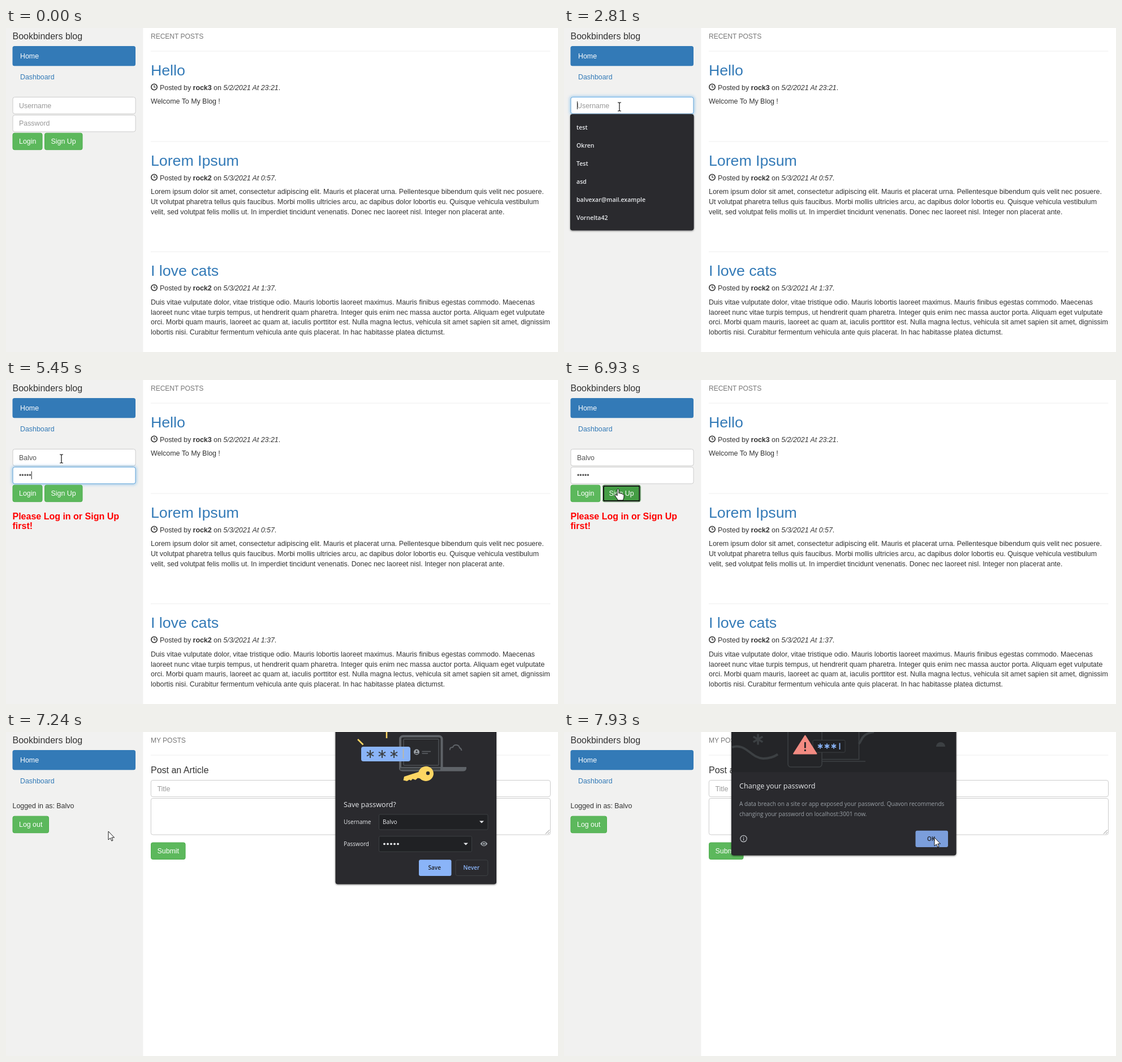
These frames come from a looping animation (976 by 574 pixels, 8000 ms). An HTML page:

```html
<!DOCTYPE html>
<html lang="en">
<head>
<meta charset="utf-8">
<title>Blog login</title>
<style>
  html, body { margin: 0; width: 100%; height: 100%; overflow: hidden; background: #fff; }
  svg { display: block; width: 976px; height: 574px; }
  text { font: 12.4px "Liberation Sans", Arial, sans-serif; fill: #333; white-space: pre; }
  .link { fill: #337ab7; }
  .white { fill: #fff; }
  .hint { fill: #999; }
  .typed { fill: #555; }
  .small { font-size: 12px; fill: #777; }
  .h4 { font-size: 16px; }
  .h2 { font-size: 26.7px; fill: #337ab7; }
  .error { font-size: 16px; font-weight: bold; fill: #f00; }
  .ui, .item, .title, .note { font: 10px "Open Sans", "Noto Sans", sans-serif; fill: #e8eaed; }
  .item { font-size: 10.6px; font-weight: 600; }
  .title { font-size: 12.6px; }
  .note { font-size: 10.1px; fill: #9aa0a6; }
  .blue { fill: #8ab4f8; font-weight: 600; }
  .dark { fill: #202124; font-weight: 600; }
</style>
</head>
<body>
<svg id="stage" viewBox="0 0 976 574"></svg>
<script>
const LOOP = 8000;
const USER = 'Balvo';
const stage = document.getElementById('stage');

// Markup helpers
const text = (x, y, str, cls = '', id = '') => `<text x="${x}" y="${y}" class="${cls}" id="${id}">${str}</text>`;
const box = (x, y, right, bottom, fill, stroke = 'none', r = 3.5, extra = '') =>
  `<rect x="${x}" y="${y}" width="${right - x}" height="${bottom - y}" rx="${r}" fill="${fill}" stroke="${stroke}" ${extra}/>`;
const line = (d, stroke, width = 1, extra = '') =>
  `<path d="${d}" fill="none" stroke="${stroke}" stroke-width="${width}" ${extra}/>`;
const group = (id, content, extra = '') => `<g id="${id}" ${extra}>${content}</g>`;
const star = (x, y, r, color, width) => [0, 60, 120].map(a =>
  line(`M0 ${-r}V${r}`, color, width, `transform="translate(${x} ${y}) rotate(${a})"`)).join('');
const rule = y => line(`M256 ${y}H962.5`, '#eee');
const button = (x, y, right, label) =>
  box(x + .5, y + .5, right - .5, y + 30, '#5cb85c', '#4cae4c', 3) + text(x + 11.5, y + 19.5, label, 'white');

const field = (id, y, hint) => group(id + 'Glow',
    box(12, y, 229, y + 29.5, 'none', '#66afe9', 3.5, 'stroke-width="4" stroke-opacity=".6" filter="url(#glow)"')) +
  box(12, y, 229, y + 29.5, '#fff', '#ccc') +
  box(12, y, 229, y + 29.5, 'none', '#66afe9', 3.5, `id="${id}Edge"`) +
  text(23, y + 19, hint, 'hint', id + 'Hint') + text(23, y + 19, '', 'typed', id) +
  line(`M.5 ${y + 7.5}V${y + 21.5}`, '#222', 1, `id="${id}Caret"`);

const post = (y, title, author, date, lines) => rule(y) +
  text(256, y + 42.7, title, 'h2') +
  `<circle cx="262" cy="${y + 63.5}" r="5.2" fill="none" stroke="#333" stroke-width="1.6"/>` +
  line(`M262 ${y + 60}V${y + 64}H264.8`, '#333', 1.2) +
  text(272, y + 68.5, `Posted by <tspan font-weight="bold">${author}</tspan> on <tspan font-style="italic">${date}</tspan>.`) +
  lines.map((s, i) => text(256, y + 93.4 + i * 17.75, s)).join('');

const homePage = text(256, 19.3, 'RECENT POSTS', 'small') +
  post(41, 'Hello', 'rock3', '5/2/2021 At 23:21', ['Welcome To My Blog !']) +
  post(201, 'Lorem Ipsum', 'rock2', '5/3/2021 At 0:57', [
    'Lorem ipsum dolor sit amet, consectetur adipiscing elit. Mauris et placerat urna. Pellentesque bibendum quis velit nec posuere.',
    'Ut volutpat pharetra tellus quis faucibus. Morbi mollis ultricies arcu, ac dapibus dolor lobortis eu. Quisque vehicula vestibulum',
    'velit, sed volutpat felis mollis ut. In imperdiet tincidunt venenatis. Donec nec laoreet nisl. Integer non placerat ante.']) +
  post(396.5, 'I love cats', 'rock2', '5/3/2021 At 1:37', [
    'Duis vitae vulputate dolor, vitae tristique odio. Mauris lobortis laoreet maximus. Mauris finibus egestas commodo. Maecenas',
    'laoreet nunc vitae turpis tempus, ut hendrerit quam pharetra. Integer quis enim nec massa auctor porta. Aliquam eget vulputate',
    'orci. Morbi quam mauris, laoreet ac quam at, iaculis porttitor est. Nulla magna lectus, vehicula sit amet sapien sit amet, dignissim',
    'lobortis nisi. Curabitur fermentum vehicula ante quis placerat. In hac habitasse platea dictumst.']) +
  group('hover', box(11.5, 69, 229, 104, '#eee')) + text(25, 91, 'Dashboard', 'link') +
  field('name', 122.5, 'Username') + field('pass', 154.3, 'Password') +
  button(11.5, 185.7, 64.5, 'Login') + button(68, 185.7, 135.5, 'Sign Up') +
  group('pressed', box(68.5, 186.2, 135, 215.7, '#449d44', '#398439', 3) +
    group('ring', box(69, 186.7, 134.5, 215.2, 'none', '#fff', 3) +
      box(70, 187.7, 133.5, 214.2, 'none', '#101010', 2, 'stroke-width="2"')) +
    text(79.5, 205.2, 'Sign Up', 'white')) +
  group('error', text(11.5, 246.8, 'Please Log in or Sign Up', 'error') + text(11.5, 263.5, 'first!', 'error'));

const dashboardPage = text(256, 19.3, 'MY POSTS', 'small') + rule(41) +
  text(25, 91, 'Dashboard', 'link') +
  text(11.5, 135.3, 'Logged in as: ' + USER) + button(11.5, 148.7, 76, 'Log out') +
  text(256, 72.5, 'Post an Article', 'h4') +
  box(256.3, 85.5, 962.5, 114.7, '#fff', '#ccc') + text(267.5, 104.5, 'Title', 'hint') +
  box(256.3, 117.5, 962.5, 182, '#fff', '#ccc') +
  line('M954 180.5L961 173.5M958 180.5L961 177.5', '#777', .9) +
  button(256, 195.5, 317.5, 'Submit');

const arrowDown = (x, y) => `<path d="M${x - 4} ${y - 2}h8l-4 4z" fill="#e8eaed"/>`;
const gray = '#5f6368', edge = '#3c4043';

const savePopup = box(583, -10, 866.5, 269, '#292a2d', '#222326', 3, 'filter="url(#shadow)"') +
  line('M622 13L631.5 22.5M673-2V11M724.5 13.5L715 22.5', '#fdd663', 2.5) +
  box(697, 7.5, 770.5, 67, '#292a2d', gray, 5, 'stroke-width="4"') +
  box(703, 12.5, 765, 59, '#292a2d', gray, 1) +
  `<path d="M695 62H814V65Q813 69.5 808 69.5H701Q695.5 69 695 65Z" fill="${gray}"/>` +
  box(697, 63.5, 768, 67.5, '#3c4043', 'none', 1) +
  '<circle cx="726" cy="35.5" r="5" fill="#9aa0a6"/><circle cx="726" cy="34" r="1.5" fill="#292a2d"/>' +
  line('M723.3 38H728.7', '#292a2d', 1.6) +
  line('M735.5 34.5H751M735.5 38H746', gray, 1.6) +
  line('M785 32Q784 27 790 27C792 21 801 22 802 28Q805 29 805.5 33', gray, 2) +
  box(628, 26, 715, 52, '#8ab4f8', 'none', 4) +
  [644, 665, 686].map(x => star(x, 39, 7, '#3c4043', 2)).join('') + line('M702.5 30V47', '#c4b998', 1.6) +
  '<path d="M732 70L704 79 702.5 85.5 709 87 713 84.5 716 86 719 83 724 85 728 81.5 735 83Z" fill="#fdd663"/>' +
  '<ellipse cx="742.5" cy="74" rx="13.5" ry="13" fill="#fdd663" transform="rotate(-18 742 74)"/><circle cx="746" cy="73" r="3.2" fill="#292a2d"/>' +
  text(597, 133.3, 'Save password?', 'title') +
  text(597, 163, 'Username', 'ui') + box(659.5, 146, 852, 173, '#202124', edge, 2) +
  text(666, 163, USER, 'ui') + arrowDown(841, 159.5) +
  text(597, 201.8, 'Password', 'ui') + box(659.5, 184.8, 823.5, 212, '#202124', edge, 2) +
  [0, 1, 2, 3, 4].map(i => `<circle cx="${669 + i * 6}" cy="198.3" r="1.9" fill="#e8eaed"/>`).join('') + arrowDown(813, 198.5) +
  '<path d="M838.5 198Q845 189.500 851.500 198Q845 206.500 838.500 198Z" fill="#9aa0a6"/><circle cx="845" cy="198" r="2.400" fill="#9aa0a6" stroke="#292a2d" stroke-width="1.2"/>' +
  box(730, 226.3, 787.5, 255, '#8ab4f8', 'none', 3) + text(746.5, 244.2, 'Save', 'ui dark') +
  box(795, 226.8, 852, 254.5, 'none', edge, 3) + text(808.5, 244.2, 'Never', 'ui blue');

const warningPopup = box(296.5, -10, 693, 218, '#292a2d', '#222326', 3, 'filter="url(#shadow)"') +
  box(297, -10, 692.5, 71, '#242528', 'none', 0) +
  star(343, 13, 9.5, edge, 3.5) +
  line('M297 27C322 19 330 46 352 47Q367 47 378 39.500', edge, 4) +
  line('M521 21C527 17 524 3 548 0', edge, 4) +
  line('M456-5H521.500V48.500H456M456 52H533', edge, 1.5) +
  box(396, -8, 456, 62, '#242528', edge, 5, 'stroke-width="1.5"') +
  box(440, 14.5, 497, 36, '#202124', edge, 2) +
  [453, 465, 477].map(x => star(x, 25.2, 4.6, '#8ab4f8', 1.8)).join('') + line('M487.5 19.500V31', '#8ab4f8', 1.8) +
  '<path d="M426.300 6.500L446.500 38.500H406Z" fill="#f28b82" stroke="#f28b82" stroke-width="2" stroke-linejoin="round"/>' +
  line('M426.3 18V28.500M426.3 31V34', '#202124', 2.8) +
  '<path d="M658 26A8 8 0 0 1 674 26Z" fill="#3c4043"/>' +
  text(310, 100, 'Change your password', 'title') +
  text(310, 131, 'A data breach on a site or app exposed your password. Quavon recommends', 'note') +
  text(310, 148.8, 'changing your password on localhost:3001 now.', 'note') +
  '<circle cx="317.5" cy="189" r="5.700" fill="none" stroke="#bdc1c6" stroke-width="1.2"/>' +
  line('M317.5 185.700V187.200M317.5 188.200V192.300', '#bdc1c6', 1.2) +
  box(621.5, 174.7, 679, 204, '#8ab4f8', 'none', 3, 'id="ok"') + text(642, 193, 'OK', 'ui dark');

const cursors =
  group('arrow', '<path d="M0 0V15L3.500 11.800 5.800 17 8 16 5.800 11H10.500Z" fill="#fff" stroke="#000" stroke-width=".9"/>') +
  group('hand', '<path d="M-2 1.500C-2-.5 1-.5 1 1.500V8C2 6.500 4.500 7 4.500 8.600 6 7.600 7.600 8.200 7.600 9.600 9 9 10 10 10 11V14C10 17 8.500 18 8.500 20H-1C-1 18-6 13-6 11-6 9.500-4 9-2 12Z" fill="#fff" stroke="#000"/>') +
  group('beam', line('M-3-7.500H-1L0-6.500 1-7.500H3M0-6.500V6.500M-3 7.500H-1L0 6.500 1 7.500H3', '#111', 1.2));

stage.innerHTML = `<defs>
    <filter id="glow" x="-20%" y="-60%" width="140%" height="220%"><feGaussianBlur stdDeviation="2.5"/></filter>
    <filter id="shadow" x="-10%" y="-10%" width="120%" height="120%"><feDropShadow dx="0" dy="1" stdDeviation="1.5" flood-opacity=".55"/></filter>
  </defs>` +
  box(0, 0, 976, 574, '#fff', 'none', 0) + box(0, 0, 242.4, 574, '#f1f1f0', 'none', 0) +
  text(11.5, 19.5, 'Bookbinders blog', 'h4') +
  box(11.5, 32, 229, 67.3, '#337ab7') + text(25, 54, 'Home', 'white') +
  group('home', homePage) + group('dashboard', dashboardPage) +
  group('menu', box(11.5, 153, 229, 358, '#292a2d', '#242528', 3, 'id="menuBox" filter="url(#shadow)"') + group('items', '')) +
  group('savePopup', savePopup) + group('warningPopup', warningPopup) + group('cursor', cursors);

const el = Object.fromEntries([...stage.querySelectorAll('[id]')].filter(n => n.id).map(n => [n.id, n]));
const show = (id, on) => { el[id].style.display = on ? '' : 'none'; };
const between = (t, a, b) => t >= a && t < b;

// Stepped time: index of the current step, and stepped fade
const stepAt = (t, start, end, n) => Math.max(-1, Math.min(n - 1, Math.floor((t - start) / (end - start) * (n - 1) + .06)));
const fade = (t, start, end) => (stepAt(t, start, end, 3) + 1) / 3;
const ease = p => { p = Math.max(0, Math.min(1, p)); return p * p * (3 - 2 * p); };
const mix = (a, b, p) => a.map((v, i) => v + (b[i] - v) * p);
const typedCount = (t, times) => times.filter(at => t >= at).length;

const NAME_TIMES = [3280, 3590, 3660, 3820, 3890];
const PASS_TIMES = [4740, 5060, 5130, 5290, 5450];
const HISTORY = ['test', 'Okren', 'Test', 'asd', 'balvexar@mail.example', 'Vornelta42'];
const MATCHES = ['balvexar@mail.example', 'Balvo', 'balvo22', 'Balvotest', 'brisk'];

const ENTRY = [777, 445], LINK = [77, 85], INPUT = [98, 139.5], SIGNUP = [96, 193], TURN = [181, 176], OK = [655, 187];

function cursorAt(t) {
  if (t < 1180) return mix(ENTRY, LINK, ease(stepAt(t, 360, 1110, 11) / 7));
  if (t < 6310) return mix(LINK, INPUT, ease((stepAt(t, 1180, 1490, 5) + 1) / 5));
  if (t < 7160) return mix(INPUT, SIGNUP, ease((stepAt(t, 6310, 7080, 11) + 1) / 5));
  const step = stepAt(t, 7160, 7930, 11);
  return step < 1 ? mix(SIGNUP, TURN, .3) : mix(TURN, OK, ease((step - 1) / 8));
}

function cursorKind(t, [x, y]) {
  if (t >= 7080 || x > 229) return 'arrow';
  if (between(y, 69, 104) && t < 1490 || y > 185 && between(x, 68, 136)) return 'hand';
  return between(y, 122, 185) ? 'beam' : 'arrow';
}

let listed = '';
function drawMenu(t, count) {
  const items = count === 0 ? HISTORY : MATCHES.slice(0, count === 1 && t < 3590 ? 5 : 4);
  const opacity = fade(t, 1720, 1870) - fade(t, 4360, 4510);
  show('menu', opacity > 0);
  el.menu.setAttribute('opacity', opacity);
  el.menuBox.setAttribute('height', 13.6 + items.length * 31.9);
  if (listed !== items.join()) {
    listed = items.join();
    el.items.innerHTML = items.map((s, i) => text(22, 180.2 + i * 31.9, s, 'item')).join('');
  }
}

function drawField(id, value, focus, caret) {
  el[id].textContent = value;
  show(id + 'Hint', !value);
  el[id + 'Glow'].setAttribute('opacity', focus);
  el[id + 'Edge'].setAttribute('opacity', focus);
  show(id + 'Caret', caret);
  const width = value ? el[id].getComputedTextLength() : 0;
  el[id + 'Caret'].setAttribute('transform', `translate(${23 + width})`);
}

function draw(t) {
  const count = typedCount(t, NAME_TIMES);
  show('home', t < 7080);
  show('dashboard', t >= 7080);
  if (t < 7080) {
    const moved = fade(t, 4360, 4510);
    drawField('name', USER.slice(0, count), fade(t, 1720, 1870) - moved,
      between(t, 1720, 2190) || between(t, 2810, 4360));
    drawField('pass', '•'.repeat(typedCount(t, PASS_TIMES)), moved - fade(t, 6770, 6920),
      between(t, 4360, 6000) || between(t, 6540, 6770));
  }
  drawMenu(t, count);
  show('error', t >= 1040);

  const [x, y] = cursorAt(t), kind = cursorKind(t, [x, y]);
  show('hover', kind === 'hand' && t < 1490);
  show('pressed', kind === 'hand' && t > 6310);
  show('ring', t >= 6770);
  show('savePopup', between(t, 7160, 7470));
  show('warningPopup', t >= 7470);
  el.ok.setAttribute('fill', x > 621 ? '#7b9edb' : '#8ab4f8');
  show('cursor', t >= 360);
  ['arrow', 'hand', 'beam'].forEach(k => show(k, k === kind));
  el.cursor.setAttribute('transform', `translate(${x} ${y})`);
}

const startTime = performance.now();
function tick() {
  draw((performance.now() - startTime) % LOOP);
  requestAnimationFrame(tick);
}
tick();
</script>
</body>
</html>
```
